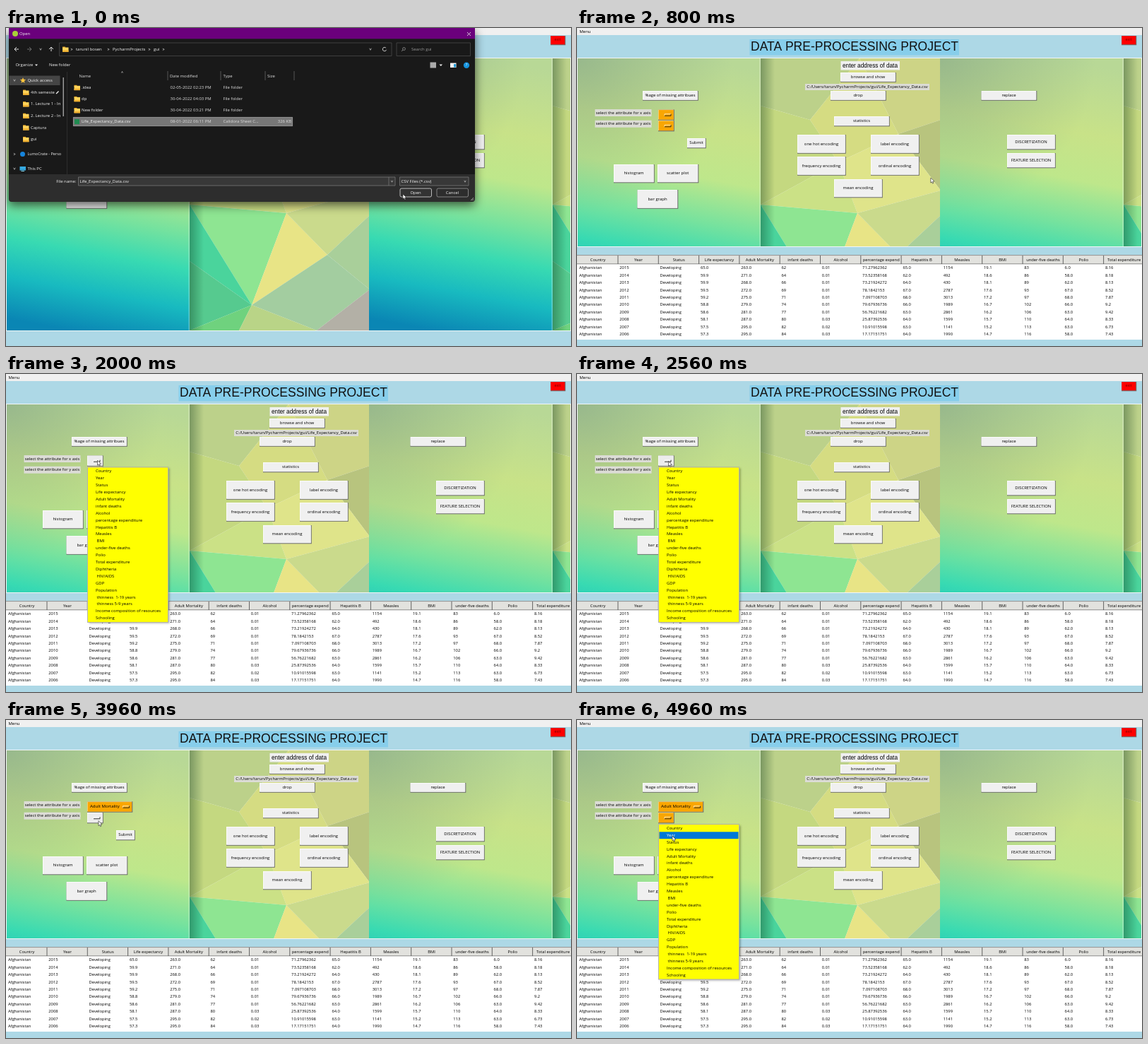
Recreate the animation shown at these times as an HTML page with a canvas. Size 800 by 450 pixels, loop 5000 ms.

```html
<!DOCTYPE html>
<html lang="en">
<head>
<meta charset="utf-8">
<title>Data pre-processing</title>
<style>
html, body { margin: 0; width: 800px; height: 450px; overflow: hidden; background: #add8e6; }
canvas { display: block; }
</style>
</head>
<body>
<canvas id="stage" width="800" height="450"></canvas>
<script>
const LOOP = 5000;
const FADE_START = 440, FADE_TIME = 140, LOADED = 720;
const X_OPEN = 1800, X_PICK = 3260, Y_OPEN = 4620;
const UI = '"Open Sans", "Noto Sans", sans-serif';
const ARIAL = '"Liberation Sans", Arial, sans-serif';

const stage = document.getElementById('stage').getContext('2d');
const layer = document.createElement('canvas');
layer.width = 800;
layer.height = 450;
const layerCtx = layer.getContext('2d');
let g = stage;

// Drawing helpers
function rect(x, y, w, h, color) {
  g.fillStyle = color;
  g.fillRect(x, y, w, h);
}
function frame(x, y, w, h, color, radius = 0) {
  g.strokeStyle = color;
  g.lineWidth = 0.8;
  g.beginPath();
  g.roundRect(x, y, w, h, radius);
  g.stroke();
}
function text(s, x, y, color = '#000', align = 'left', size = 5.95, family = UI) {
  g.font = `${size}px ${family}`;
  g.fillStyle = color;
  g.textAlign = align;
  g.textBaseline = 'middle';
  g.fillText(s, x, y);
}
function line(color, width, ...pts) {
  g.strokeStyle = color;
  g.lineWidth = width;
  g.beginPath();
  for (let i = 0; i < pts.length; i += 2) g.lineTo(pts[i], pts[i + 1]);
  g.stroke();
}
function poly(color, pts) {
  g.fillStyle = color;
  g.beginPath();
  pts.forEach(p => g.lineTo(p[0], p[1]));
  g.closePath();
  g.fill();
}
function dot(x, y, r, color) {
  g.fillStyle = color;
  g.beginPath();
  g.arc(x, y, r, 0, 7);
  g.fill();
}
function shades(gradient, ...stops) {
  stops.forEach(([at, color]) => gradient.addColorStop(at, color));
  return gradient;
}
function raised(x, y, w, h, color = '#f0f0f0', light = '#fff') {
  rect(x, y, w + 0.8, h + 0.8, '#6d6d6d');
  rect(x, y, w - 0.4, h - 0.4, light);
  rect(x + 0.7, y + 0.7, w - 1, h - 1, color);
}
function button(s, x, y, w, h) {
  raised(x, y, w, h);
  text(s, x + w / 2, y + h / 2, '#000', 'center');
}

// Panel background: a soft gradient beside a faceted pattern, repeated once
const POINTS = {
  a: [260, 43], b: [400, 43], c: [515, 43], d: [260, 110], e: [330, 130],
  f: [455, 150], g: [515, 130], h: [370, 190], i: [515, 230], j: [260, 250],
  k: [397, 262], l: [515, 265], m: [455, 321], n: [348, 392], o: [260, 330],
  p: [515, 370], q: [260, 428], r: [330, 428], s: [440, 428], t: [515, 428]
};
const FACES = {
  abed: '#bcd18a', bcgf: '#cdd486', bfhe: '#d5dc82', dehj: '#c4d880', gfi: '#b8c47e',
  fikh: '#dfe48a', jhk: '#cbe186', jkn: '#8ee592', jno: '#4ad49c', onq: '#56ca8f',
  kmn: '#e8e486', kilm: '#cada8c', lmp: '#a9cf9a', mnsp: '#a3cda0', pst: '#b3b0a6',
  qnr: '#6fd27e', nsr: '#b9d487'
};

function tile() {
  rect(0, 43, 260, 386, shades(g.createLinearGradient(165, 43, 95, 428),
    [0, '#b8d896'], [0.25, '#c8e288'], [0.42, '#bee78b'], [0.58, '#76e29e'],
    [0.71, '#38dab2'], [0.85, '#18bac0'], [1, '#0a86b4']));
  rect(0, 43, 260, 386, shades(g.createRadialGradient(0, 43, 0, 0, 43, 220),
    [0, 'rgba(115,150,135,.5)'], [1, 'rgba(115,150,135,0)']));
  for (const [names, color] of Object.entries(FACES)) {
    poly(color, [...names].map(n => POINTS[n]));
  }
  rect(260, 43, 20, 386, shades(g.createLinearGradient(260, 0, 280, 0),
    [0, 'rgba(0,45,20,.35)'], [1, 'rgba(0,45,20,0)']));
  rect(258.5, 43, 1.5, 386, 'rgba(255,255,255,.3)');
}
function backdrop(bottom) {
  rect(0, 42, 800, bottom - 41, '#f2f6f6');
  g.save();
  g.beginPath();
  g.rect(1, 43, 798, bottom - 43);
  g.clip();
  tile();
  g.translate(514, 0);
  tile();
  g.restore();
}

// Data table
const HEADS = ['Country', 'Year', 'Status', 'Life expectancy', 'Adult Mortality', 'infant deaths',
  'Alcohol', 'percentage expend', 'Hepatitis B', 'Measles', 'BMI', 'under-five deaths', 'Polio',
  'Total expenditure'];
const ROWS = `65.0 263.0 62 0.01 71.27962362 65.0 1154 19.1 83 6.0 8.16
59.9 271.0 64 0.01 73.52358168 62.0 492 18.6 86 58.0 8.18
59.9 268.0 66 0.01 73.21924272 64.0 430 18.1 89 62.0 8.13
59.5 272.0 69 0.01 78.1842153 67.0 2787 17.6 93 67.0 8.52
59.2 275.0 71 0.01 7.097108703 68.0 3013 17.2 97 68.0 7.87
58.8 279.0 74 0.01 79.67936736 66.0 1989 16.7 102 66.0 9.2
58.6 281.0 77 0.01 56.76221682 63.0 2861 16.2 106 63.0 9.42
58.1 287.0 80 0.03 25.87392536 64.0 1599 15.7 110 64.0 8.33
57.5 295.0 82 0.02 10.91015598 63.0 1141 15.2 113 63.0 6.73
57.3 295.0 84 0.03 17.17151751 64.0 1990 14.7 116 58.0 7.43`.split('\n').map(
  (row, i) => ['Afghanistan', String(2015 - i), 'Developing', ...row.split(' ')]);
const COLUMN = 57.3;

function table() {
  rect(0, 321, 800, 120, '#fff');
  rect(0, 321.5, 800, 12.5, '#e2e2de');
  line('#777', 0.8, 0, 321.6, 800, 321.6);
  line('#777', 0.8, 0, 333.8, 800, 333.8);
  HEADS.forEach((head, i) => {
    line('#555', 0.9, (i + 1) * COLUMN + 0.7, 322, (i + 1) * COLUMN + 0.7, 334);
    text(head, (i + 0.5) * COLUMN + 1, 328, '#000', 'center', 5.8);
  });
  ROWS.forEach((row, r) => row.forEach((cell, c) =>
    text(cell, c * COLUMN + 3, 339.8 + r * 10.4, '#000', 'left', 5.8)));
}

// Main window
const BUTTONS = [
  ['%age of missing attribues', 93, 89, 78, 13], ['browse and show', 373, 63, 78, 13],
  ['drop', 359, 89, 78, 13], ['replace', 572.5, 89, 78, 13], ['statistics', 364, 125, 78, 13.5],
  ['one hot encoding', 312, 151, 68, 26], ['label encoding', 416, 151, 68, 26],
  ['frequency encoding', 312, 182, 68, 26], ['ordinal encoding', 416, 182, 68, 26],
  ['mean encoding', 364, 214, 68, 25.5], ['DISCRETIZATION', 609, 151, 68, 20.5],
  ['FEATURE SELECTION', 609, 177, 68, 20.5], ['histogram', 52, 193, 57, 25.5],
  ['scatter plot', 114, 193, 57.5, 25.5], ['bar graph', 85.5, 229, 57, 26]
];

function dropdown(y, value, pointer) {
  const w = value ? 63.5 : 22;
  const hover = pointer.x > 115 && pointer.x < 115 + w && pointer.y > y && pointer.y < y + 15;
  raised(115, y, w, 14.5, hover ? '#ececec' : '#f9a602', hover ? '#fff' : '#ffd690');
  text(value, 119, y + 7.5, '#000', 'left', 6.05);
  const x = 115 + w - 13;
  line('#fff', 0.7, x, y + 8.8, x, y + 6.3, x + 9, y + 6.3);
  line('#222', 0.9, x, y + 8.8, x + 9, y + 8.8, x + 9, y + 6.3);
}
function mainWindow(t, pointer) {
  const loaded = t >= LOADED;
  rect(0, 0, 800, 450, '#add8e6');
  rect(0, 0, 800, 10, '#f0f0f0');
  text('Menu', 3.5, 5);
  rect(244.5, 16, 296.5, 22.5, '#87ceeb');
  text('DATA PRE-PROCESSING PROJECT', 393, 27.3, '#111', 'center', 17.5, ARIAL);
  raised(771, 11, 20.5, 12.5, '#f00', '#c33');
  text('exit', 781, 17, '#700', 'center', 5.5);
  backdrop(loaded ? 309 : 428);
  rect(373.5, 47, 83.5, 12.5, '#f0f0f0');
  text('enter address of data', 415, 53.5, '#000', 'center', 8.25, ARIAL);
  BUTTONS.forEach(b => button(...b));
  if (!loaded) return;
  rect(323, 79, 176, 9, '#dcdcd6');
  text('C:/Users/tarun/PycharmProjects/gui/Life_Expectancy_Data.csv', 411, 83.5, '#000', 'center');
  ['x', 'y'].forEach((axis, i) => {
    rect(25.5, 115 + i * 15.7, 80, 10, '#dcdcd6');
    text(`select the attribute for ${axis} axis`, 65.5, 120 + i * 15.7, '#000', 'center', 5.85);
  });
  dropdown(115.4, t >= X_PICK ? 'Adult Mortality' : '', pointer);
  dropdown(131, '', pointer);
  button('Submit', 156, 156, 26, 13.5);
  table();
}

// Attribute menu
const ITEMS = ['Country', 'Year', 'Status', 'Life expectancy', 'Adult Mortality', 'infant deaths',
  'Alcohol', 'percentage expenditure', 'Hepatitis B', 'Measles', ' BMI', 'under-five deaths', 'Polio',
  'Total expenditure', 'Diphtheria', ' HIV/AIDS', 'GDP', 'Population', ' thinness  1-19 years',
  ' thinness 5-9 years', 'Income composition of resources', 'Schooling'];
const ITEM = 9.9;

function attributeMenu(top, pointer) {
  g.save();
  g.shadowColor = 'rgba(0,0,0,.35)';
  g.shadowBlur = 3;
  g.shadowOffsetX = g.shadowOffsetY = 1.5;
  rect(115, top, 115, 220.5, '#b4b4a8');
  g.restore();
  rect(116, top + 1, 113, 218.5, '#ff0');
  const active = Math.floor((pointer.y - top - 1.5) / ITEM);
  ITEMS.forEach((item, i) => {
    if (i === active) rect(116.5, top + 1.4 + i * ITEM, 112, ITEM, '#0078d7');
    text(item, 127, top + 6.4 + i * ITEM, i === active ? '#fff' : '#000');
  });
}

// File dialog
function chevron(x, y, dx, dy, color = '#bbb') {
  line(color, 0.8, x - dx - dy, y - dy + dx, x + dx, y + dy, x - dx + dy, y - dy - dx);
}
function folder(x, y) {
  rect(x, y - 3.5, 4, 2, '#e0a020');
  rect(x, y - 2.5, 8.5, 6.3, '#ffd35a');
  rect(x, y + 1.5, 8.5, 2.3, '#f0b030');
}
function arrow(x, y, dx, dy, color) {
  line(color, 0.9, x - 3 * dx, y - 3 * dy, x + 3 * dx, y + 3 * dy);
  line(color, 0.9, x + 3 * dy, y + 3 * dx, x + 3 * dx, y + 3 * dy, x - 3 * dy, y - 3 * dx);
}
function dialog(hover) {
  const white = '#f4f4f4', grey = '#9a9a9a';
  g.save();
  g.shadowColor = 'rgba(0,0,0,.6)';
  g.shadowBlur = 14;
  g.shadowOffsetY = 5;
  g.fillStyle = '#2d2d2d';
  g.beginPath();
  g.roundRect(4, 0, 660, 246, 4);
  g.fill();
  g.restore();

  rect(4, 0, 660, 15.5, '#6b007c');
  dot(13, 8, 4, '#a8d038');
  text('Open', 19, 8.2, white);
  line(white, 0.8, 653, 6, 658, 11);
  line(white, 0.8, 658, 6, 653, 11);
  rect(4, 15.5, 660, 191.5, '#191919');

  arrow(15, 30, -1, 0, white);
  arrow(33, 30, 1, 0, '#777');
  chevron(49, 30, 0, 1.3);
  arrow(64, 30, 0, -1, white);
  frame(75.5, 21, 470.5, 18.5, '#4a4a4a');
  folder(80, 30);
  [['tarunil bosen', 99], ['PycharmProjects', 151], ['gui', 209]].forEach(([s, x]) => text(s, x, 30.3, white));
  [93, 145, 203, 223].forEach(x => chevron(x, 30.3, 1.2, 0));
  chevron(516, 30, 0, 1.3);
  g.beginPath();
  g.arc(536, 30, 2.7, 0.3, 5.6);
  g.strokeStyle = white;
  g.stroke();
  frame(553, 21, 104.5, 18.5, '#4a4a4a');
  g.beginPath();
  g.arc(563.5, 29.5, 1.9, 0, 7);
  g.strokeStyle = grey;
  g.stroke();
  line(grey, 0.8, 562, 31, 560, 33);
  text('Search gui', 574, 30.3, grey);

  text('Organize', 13.5, 52.5, white);
  text('New folder', 61, 52.5, white);
  poly(white, [[41, 51.5], [45, 51.5], [43, 53.7]]);
  rect(600.5, 48.5, 8.5, 8, '#aaa');
  poly(white, [[613.5, 51.5], [618, 51.5], [615.8, 54]]);
  rect(629, 49.5, 8.5, 6.5, white);
  rect(634, 51, 3, 4.5, '#2a9fd8');
  dot(652, 52.7, 4.2, '#1592dc');
  text('?', 652, 52.8, '#fff', 'center');

  rect(4.5, 67.5, 72, 13.5, '#454545');
  rect(80.5, 70, 1.5, 55, '#999');
  line('#333', 0.8, 86.5, 62, 86.5, 207);
  chevron(12, 74, 0, 1.3);
  chevron(12, 178.5, 1.2, 0);
  chevron(12, 199, 0, 1.3);
  poly('#ffc53d', Array.from({ length: 10 }, (_, i) => {
    const r = i % 2 ? 1.9 : 4.4, a = i * Math.PI / 5;
    return [24 + r * Math.sin(a), 74.3 - r * Math.cos(a)];
  }));
  text('Quick access', 30.5, 74.5, white);
  ['4th semeste', '1. Lecture 1 - In', '2. Lecture 2 - In', 'Captura', 'gui'].forEach((s, i) => {
    folder(24, 91 + i * 16.6);
    text(s, 35, 91.2 + i * 16.6, white);
  });
  line(white, 1.3, 71, 93, 74.5, 89.5);
  dot(23.5, 178.5, 3.5, '#1684dc');
  text('LumoCrate - Perso', 30.5, 178.8, white, 'left', 5.5);
  rect(19.5, 196, 8.5, 5.5, '#36a9e0');
  rect(21.5, 202, 4.5, 1, '#8cd');
  text('This PC', 30.5, 199.3, white);

  [['Name', 103.5], ['Date modified', 232], ['Type', 307.5], ['Size', 370]].forEach(([s, x]) => text(s, x, 68.2, '#ddd'));
  [229, 304, 367, 408].forEach(x => line('#666', 0.8, x, 61, x, 74));
  chevron(164.5, 62.5, 0, -1);
  rect(95, 126, 311, 13, '#777');
  frame(95.4, 126.4, 310.2, 12.2, '#999');
  [['.idea', '02-05-2022 02:23 PM'], ['dp', '30-04-2022 04:03 PM'], ['New folder', '30-04-2022 03:21 PM'],
    ['Life_Expectancy_Data.csv', '08-01-2022 06:11 PM', 'Calidora Sheet C...', '326 KB']
  ].forEach(([name, date, type = 'File folder', size = ''], i) => {
    const y = 84.3 + i * 16.1;
    if (size) rect(97, y - 3.5, 7, 7, '#1f8a50');
    else folder(96.5, y);
    text(name, 107, y, white);
    text(date, 232.5, y, '#ddd');
    text(type, 307.5, y, '#ddd');
    text(size, 404, y, '#ddd', 'right');
  });

  text('File name:', 99.5, 217, white, 'right');
  rect(102.5, 211, 448.5, 12, '#383838');
  frame(102.5, 211, 448.5, 12, '#777');
  text('Life_Expectancy_Data.csv', 104.5, 217.2, white);
  line('#777', 0.8, 542, 211, 542, 223);
  chevron(546.5, 217, 0, 1.2);
  rect(557.5, 211, 97.5, 12, '#383838');
  frame(557.5, 211, 97.5, 12, '#777');
  text('CSV Files (*.csv)', 559.5, 217.2, white);
  chevron(650, 217, 0, 1.2);
  rect(558, 227, 44.5, 12, hover ? '#666' : '#333');
  frame(558, 227, 44.5, 12, '#ddd', 2);
  text('Open', 580, 233, white, 'center');
  frame(610, 227, 44.5, 12, '#999', 2);
  text('Cancel', 632, 233, white, 'center');
  for (let i = 0; i < 3; i++) line('#aaa', 0.8, 658 + i * 1.7, 244, 662, 240 + i * 1.7);
}
function fadingDialog(t) {
  const p = Math.max(0, (t - FADE_START) / FADE_TIME);
  if (p >= 1) return;
  g = layerCtx;
  g.clearRect(0, 0, 800, 450);
  dialog(t > 200);
  g = stage;
  const scale = 1 - 0.035 * p;
  g.save();
  g.globalAlpha = 1 - p;
  g.translate(334, 123);
  g.scale(scale, scale);
  g.drawImage(layer, -334, -123);
  g.restore();
}

// Pointer: time, x, y
const PATH = [[0, 562, 235], [100, 562, 235], [400, 582, 227], [620, 582, 227], [1120, 310, 177],
  [1200, 310, 177], [1680, 129.5, 121.5], [2400, 129.5, 123], [2600, 129.5, 123.5], [3100, 150, 174],
  [3440, 150, 174], [3900, 131, 142.7], [4600, 131, 142.7], [4940, 135, 164], [LOOP, 135, 164]];

function pointerAt(t) {
  const i = PATH.findIndex(key => key[0] > t);
  const [t0, x0, y0] = PATH[i - 1], [t1, x1, y1] = PATH[i];
  const u = (t - t0) / (t1 - t0), e = u * u * (3 - 2 * u);
  return { x: x0 + (x1 - x0) * e, y: y0 + (y1 - y0) * e };
}
function drawPointer({ x, y }) {
  const shape = [[0, 0], [0, 7], [1.6, 5.6], [2.6, 8], [3.8, 7.5], [2.8, 5.1], [5, 5]]
    .map(([dx, dy]) => [x + dx, y + dy]);
  poly('#fff', shape);
  line('#222', 0.6, ...shape.flat(), x, y);
}

function draw() {
  const t = performance.now() % LOOP;
  const pointer = pointerAt(t);
  mainWindow(t, pointer);
  fadingDialog(t);
  if (t >= X_OPEN && t < X_PICK) attributeMenu(131.4, pointer);
  if (t >= Y_OPEN) attributeMenu(147, pointer);
  drawPointer(pointer);
  requestAnimationFrame(draw);
}
draw();
</script>
</body>
</html>
```
